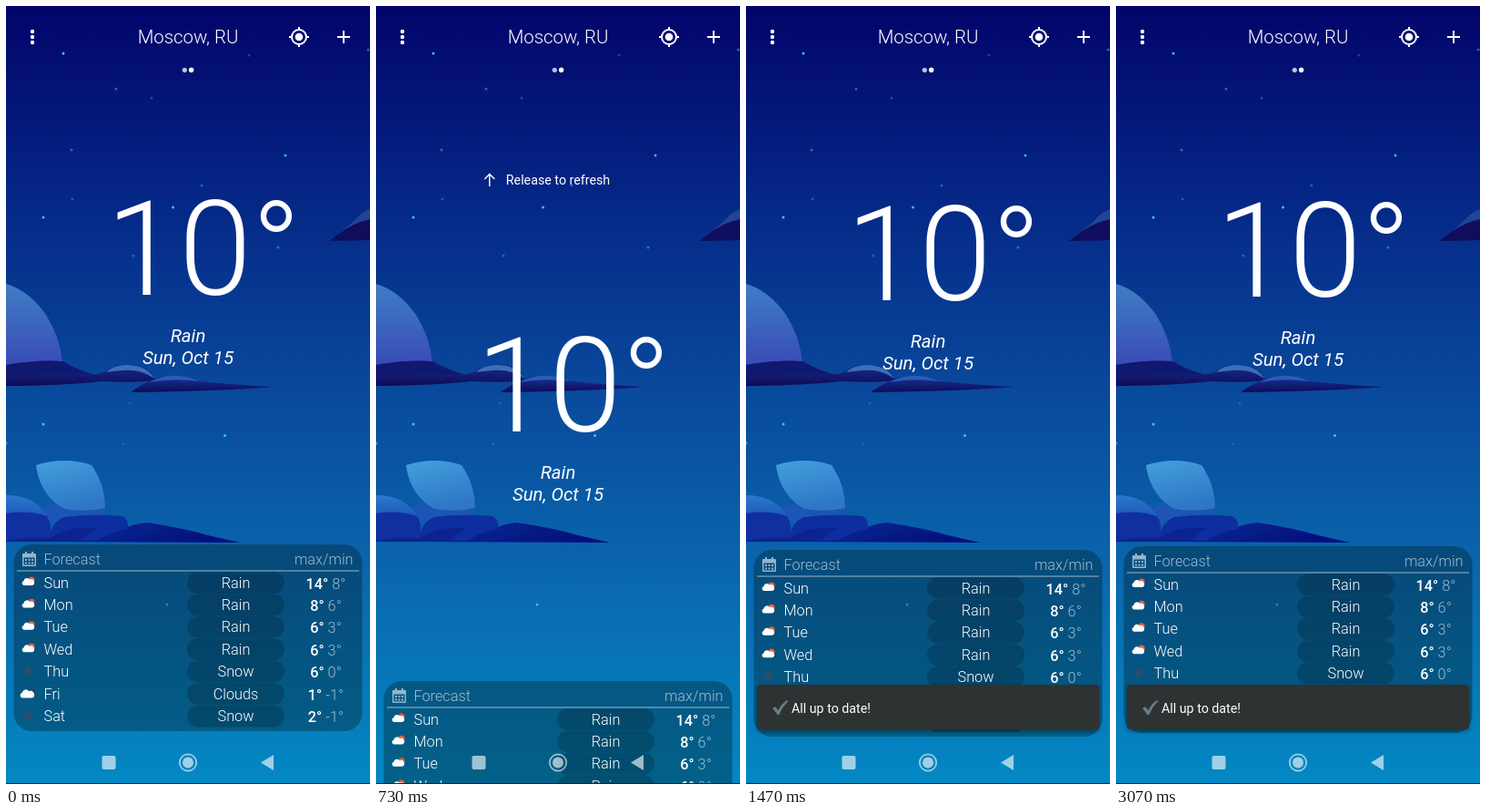
An HTML page for the animation above (3470 ms loop, 400 by 854 pixels).

```html
<!DOCTYPE html>
<html lang="en">
<head>
<meta charset="utf-8">
<title>Weather refresh</title>
<style>
  html, body { margin: 0; width: 100%; height: 100%; overflow: hidden; background: #02046a; }
  svg { display: block; width: 100%; height: 100%; font-family: Roboto, sans-serif; fill: #fff; }
  .light { font-weight: 300; }
  .mid { text-anchor: middle; }
  .dim { fill: #fff; fill-opacity: .62; }
  .line { fill: none; stroke: #fff; }
</style>
</head>
<body>
<svg viewBox="0 0 400 854">
  <defs>
    <linearGradient id="sky" x2="0" y2="1">
      <stop stop-color="#02046a"/>
      <stop offset=".25" stop-color="#052786"/>
      <stop offset=".5" stop-color="#094a9c"/>
      <stop offset=".75" stop-color="#0a69af"/>
      <stop offset="1" stop-color="#0388c3"/>
    </linearGradient>
    <linearGradient id="dome" x2="0" y2="1">
      <stop stop-color="#3f7dc4"/><stop offset="1" stop-color="#394cb6"/>
    </linearGradient>
    <linearGradient id="ridge" x2="0" y2="1">
      <stop stop-color="#16379c"/><stop offset="1" stop-color="#0f0a56"/>
    </linearGradient>
    <linearGradient id="rock" x2=".3" y2="1">
      <stop stop-color="#43a0dc"/><stop offset="1" stop-color="#2f76c6"/>
    </linearGradient>
    <linearGradient id="mound" x2="0" y2="1">
      <stop stop-color="#2b78cc"/><stop offset="1" stop-color="#1236a4"/>
    </linearGradient>
    <linearGradient id="tail" x2="1" y2=".3">
      <stop stop-color="#0b2f9c"/><stop offset="1" stop-color="#03107c"/>
    </linearGradient>
    <clipPath id="pullArea"><path d="M0 80H400V854H0Z"/></clipPath>
    <filter id="shadow" x="-5%" y="-30%" width="110%" height="170%">
      <feDropShadow dx="0" dy="2" stdDeviation="2.5" flood-opacity=".4"/>
    </filter>
  </defs>

  <path fill="url(#sky)" d="M0 0H400V854H0Z"/>
  <g id="stars" fill="#35c8ee"></g>

  <!-- upper clouds -->
  <path fill="#0f0d5c" d="M355 258Q372 246 384 234Q391 225 400 223V257Z"/>
  <path fill="#1f4498" d="M363 252Q376 242 385 233Q392 225 400 223V234Q381 238 363 252Z"/>
  <path fill="url(#ridge)" d="M0 389L62 389Q78 399 95 404Q106 405 113 398Q130 391 147 395Q161 400 164 411Q140 414 105 412Q60 417 0 417Z"/>
  <path fill="#3a70b9" d="M110 402Q117 395 131 394Q155 394 163 409Q148 398 128 400Q117 401 110 402Z"/>
  <path fill="url(#dome)" d="M0 305Q25 312 44 339Q59 363 62 390Q32 388 0 394Z"/>
  <path fill="#10186f" d="M0 394Q34 388 62 390Q76 399 95 404Q48 403 0 407Z"/>
  <path fill="url(#ridge)" d="M138 423Q153 413 166 408Q184 403 205 411Q250 416 295 418Q235 423 138 424Z"/>
  <path fill="#2c5db3" d="M158 413Q184 399 212 412Q184 408 158 413Z"/>

  <!-- lower rocks -->
  <path fill="url(#rock)" d="M33 504Q65 494 94 504Q109 525 109 551Q89 557 65 553Q37 537 33 504Z"/>
  <path fill="#1d55b4" d="M40 551Q53 543 64 552Q88 556 109 551Q108 561 92 563L43 567Z"/>
  <path fill="url(#mound)" d="M0 537Q31 537 46 560L46 584L0 588Z"/>
  <path fill="#11309f" d="M0 557Q24 553 45 560Q52 570 48 588H0Z"/>
  <path fill="url(#tail)" d="M42 588L127 575Q140 568 155 567Q195 573 222 581L257 589Z"/>
  <path fill="#0d2e9f" d="M48 585Q49 567 64 561Q95 557 128 560Q135 563 134 574Q115 577 100 587Z"/>
  <path fill="#0b2290" d="M0 587Q23 582 48 584Q70 570 100 573Q88 580 80 588H0Z"/>

  <!-- app bar -->
  <circle cx="29" cy="28" r="2.2"/><circle cx="29" cy="34" r="2.2"/><circle cx="29" cy="40" r="2.2"/>
  <text class="light mid" x="200" y="41" font-size="20.36">Moscow, RU</text>
  <circle cx="196.3" cy="70.3" r="2.6" opacity=".75"/><circle cx="203.6" cy="70.3" r="2.7"/>
  <circle cx="322" cy="34" r="4.3"/>
  <g class="line" stroke-width="2">
    <circle cx="322" cy="34" r="8"/>
    <path d="M322 23v4M322 41v4M311 34h4M329 34h4M364 34h14M371 27v14"/>
  </g>

  <g clip-path="url(#pullArea)">
    <g id="header" font-size="14.25">
      <text id="status" class="mid" x="200" y="46"></text>
      <path id="arrow" class="line" stroke-width="1.4" d="M0 7V-6.5M-5.5 -1L0 -6.5L5.5 -1"/>
      <g id="spinner" class="line" stroke-width="1.7" stroke-linecap="round"></g>
    </g>
  </g>

  <g id="content">
    <text class="light" x="110" y="316.500" font-size="144">10°</text>
    <g class="mid" font-size="20.36" font-style="italic">
      <text x="200" y="369">Rain</text>
      <text x="200" y="393">Sun, Oct 15</text>
    </g>
    <rect x="8.5" y="591" width="383" height="205" rx="20" fill="#001e28" fill-opacity=".37"/>
    <g fill="#93b5cb">
      <path fill-rule="evenodd" d="M19 601h2v-2h2v2h5v-2h2v2h2q1 0 1 1v12q0 1-1 1h-13q-1 0-1-1v-12q0-1 1-1ZM19.500 605.500v8h12v-8Z"/>
      <path d="M21 607h2v2h-2zM24.500 607h2v2h-2zM28 607h2v2h-2zM21 610.500h2v2h-2zM24.500 610.500h2v2h-2zM28 610.500h2v2h-2z"/>
    </g>
    <g class="light dim" font-size="16.3">
      <text x="41.500" y="613">Forecast</text>
      <text x="381.500" y="613" text-anchor="end">max/min</text>
    </g>
    <path class="line" stroke-opacity=".6" d="M12 620H388"/>
    <g id="rows" font-size="16.3"></g>
  </g>

  <g id="toast">
    <rect x="12" y="745" width="376" height="49" rx="4" fill="#2f3133" filter="url(#shadow)"/>
    <path fill="#667d88" d="M29 771L32 769L35.500 773Q39 766 45 762L46.500 763Q40 769 36.500 778H34.500Q32 774 29 771Z"/>
    <text x="50" y="775.500" font-size="14.25">All up to date!</text>
  </g>

  <!-- system navigation -->
  <g class="dim">
    <rect x="105.500" y="823" width="15" height="15" rx="2"/>
    <circle cx="200" cy="830.500" r="6"/>
    <path d="M280 830.500L294 822V839Z"/>
    <circle class="line" cx="200" cy="830.500" r="9.200" stroke-width="1.700" stroke-opacity=".62"/>
  </g>
  <path fill="#04304f" d="M0 853H400V854H0Z"/>
</svg>

<script>
const $ = id => document.getElementById(id);
const LOOP = 3470, FRAME = 1000 / 15;
const RELEASE = 19 * FRAME, REST = 2;

const stars = [
  [63, 52, 1], [121, 91, .5], [160, 101, .35], [72, 158, .5], [73, 212, .35],
  [307, 164, .9], [183.5, 221, 1], [215, 197, .4], [41, 232, 1], [140, 274, .4],
  [299, 265, .5], [41, 459, 1], [129, 481, .25], [240.5, 471.5, 1], [177, 657, 1],
  [0, 480, .8], [136, 436, .25], [267, 54, .3], [398, 48, .5]
];
$('stars').innerHTML = stars.map(([x, y, glow]) =>
  `<circle cx="${x}" cy="${y}" r="1.500" opacity="${glow}"/>`).join('');

const cloud = '<path d="M-5 4a2.600 2.600 0 0 1 0-5a3.600 3.600 0 0 1 6.500-1.500a3.300 3.300 0 0 1 3 6.500Z"/>';
const icons = {
  Rain: `<circle cx="3.500" cy="-2" r="3.600" fill="#e5603f"/>${cloud}`,
  Clouds: `<circle cx="4" cy="-1" r="3.600" fill="#283f50"/><g transform="translate(-1 1) scale(1.150)">${cloud}</g>`,
  Snow: '<path class="line" style="stroke:#4a4858" stroke-opacity=".75" stroke-width="1.800" d="M0-5V5M-4.300-2.500L4.300 2.500M-4.300 2.500L4.300-2.500"/>'
};
const days = [
  ['Sun', 'Rain', 14, 8], ['Mon', 'Rain', 8, 6], ['Tue', 'Rain', 6, 3], ['Wed', 'Rain', 6, 3],
  ['Thu', 'Snow', 6, 0], ['Fri', 'Clouds', 1, -1], ['Sat', 'Snow', 2, -1]
];
$('rows').innerHTML = days.map(([day, sky, max, min], i) => `
  <g transform="translate(0 ${633 + 24.4 * i})">
    <g transform="translate(24.500 -1)">${icons[sky]}</g>
    <text class="light" x="41.500" y="5.500">${day}</text>
    <rect x="199" y="-12" width="107" height="24" rx="12" fill="#000" fill-opacity=".19"/>
    <text class="light mid" x="252.500" y="5.500">${sky}</text>
    <text class="mid" x="351.500" y="6.500"><tspan font-weight="500">${max}°</tspan><tspan class="light dim"> ${min}°</tspan></text>
  </g>`).join('');

$('spinner').innerHTML = Array.from({ length: 12 }, (_, i) =>
  `<path d="M0-5V-8.700" transform="rotate(${30 * i})" stroke-opacity="${.65 + .35 * i / 11}"/>`).join('');

// The finger drags against growing resistance, then a damped spring pulls back.
const drag = t => 203 * (1 - Math.exp(-.0021 * Math.max(0, t - 94)));
function pullOffset(t) {
  if (t <= RELEASE) return drag(t);
  const s = .028 * (t - RELEASE);
  return REST + (drag(RELEASE) - REST) * (1 + s) * Math.exp(-s);
}

function render(time) {
  const t = Math.floor((time % LOOP + 5) / FRAME) * FRAME;
  const offset = Math.round(pullOffset(t));
  const refreshing = t > 1190, ready = offset > 80;
  const label = refreshing ? 'Refreshing…' : ready ? 'Release to refresh' : 'Pull to refresh';
  const status = $('status');
  if (status.textContent !== label) status.textContent = label;

  const iconX = 182 - status.getComputedTextLength() / 2;
  $('arrow').setAttribute('transform', `translate(${iconX} 41) rotate(${ready ? 0 : 180})`);
  $('spinner').setAttribute('transform', `translate(${iconX} 41) rotate(${Math.floor(t / FRAME) * 30})`);
  $('arrow').style.display = refreshing ? 'none' : '';
  $('spinner').style.display = refreshing ? '' : 'none';

  for (const id of ['header', 'content']) $(id).setAttribute('transform', `translate(0 ${offset})`);
  $('toast').style.opacity = Math.min(1, Math.max(0, (t - 1310) / 140));
}

const start = performance.now();
function tick() {
  render(performance.now() - start);
  requestAnimationFrame(tick);
}
tick();
</script>
</body>
</html>
```
